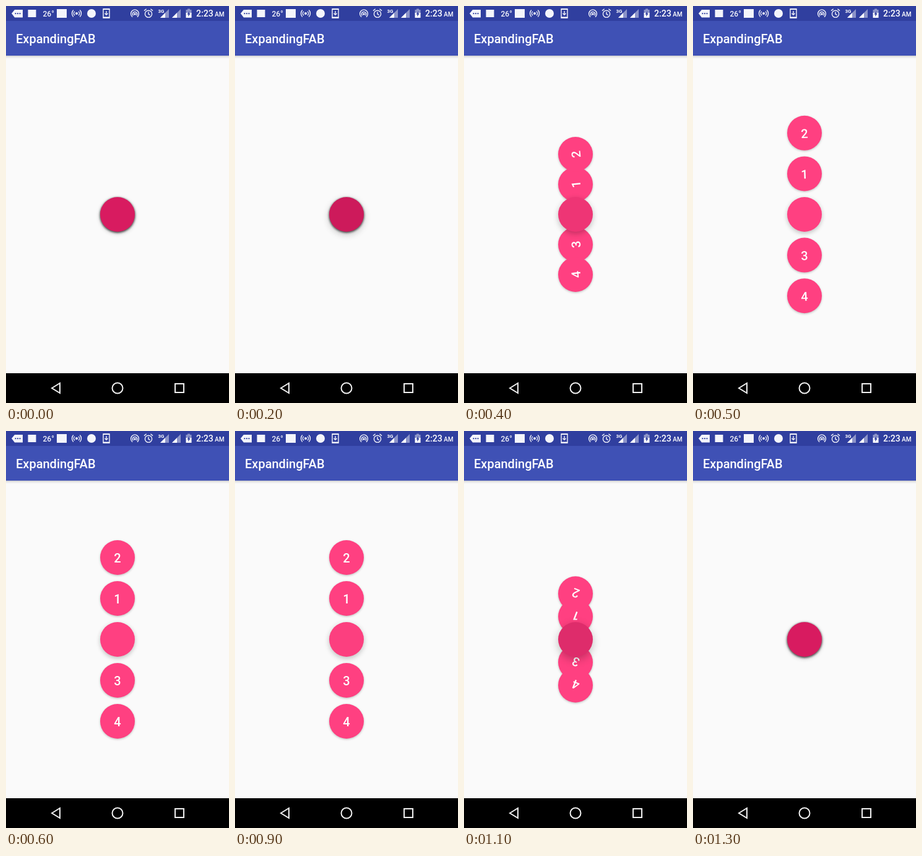
Recreate the animation shown at these times as an HTML page with a canvas. Size 360x640 px, loop 1.4 s.

```html
<!DOCTYPE html>
<html lang="en">
<head>
<meta charset="utf-8">
<title>ExpandingFAB</title>
<style>
html, body { margin: 0; width: 100%; height: 100%; overflow: hidden; background: #fafafa; }
canvas { display: block; width: 360px; height: 640px; }
</style>
</head>
<body>
<canvas id="stage" width="360" height="640"></canvas>
<script>
const ctx = document.getElementById('stage').getContext('2d');
const LOOP = 1400, STEP = 100;
const PRESS_EVERY = 800, PRESS_PEAK = 270, PRESS_SPREAD = 200;
const CX = 180, CY = 336, R = 28, GAP = 66;
const CLOSED = [216, 27, 96], OPENED = [255, 64, 129];
const SLOTS = { 1: -1, 2: -2, 3: 1, 4: 2 };
const FONT = 'Roboto, "Noto Sans", sans-serif';
const TAU = 2 * Math.PI;

const clamp = v => Math.min(1, Math.max(0, v));
const rgb = parts => `rgb(${parts.join(',')})`;

// Decelerates while opening, accelerates while closing
function openness(t) {
  if (t < PRESS_EVERY) return 1 - (1 - clamp((t - 289.5) / 228)) ** 2;
  return 1 - clamp((t - 916) / 277) ** 2;
}

// Strength of the touch on the main button
function pressure(t) {
  return clamp(1 - Math.abs(t % PRESS_EVERY - PRESS_PEAK) / PRESS_SPREAD);
}

function mainColor(open, press) {
  return rgb(CLOSED.map((c, i) => (c + (OPENED[i] - c) * open) * (1 - 0.08 * press)));
}

function text(str, x, y, size, weight = 500, align = 'left') {
  ctx.font = `${weight} ${size}px ${FONT}`;
  ctx.textAlign = align;
  ctx.fillText(str, x, y);
}

function rect(color, x, y, w, h) {
  ctx.fillStyle = color;
  ctx.fillRect(x, y, w, h);
}

function path(...points) {
  ctx.beginPath();
  points.forEach(([x, y]) => ctx.lineTo(x, y));
}

function poly(...points) {
  path(...points);
  ctx.fill();
}

function line(...points) {
  path(...points);
  ctx.stroke();
}

function dot(x, y, r) {
  ctx.beginPath();
  ctx.arc(x, y, r, 0, TAU);
  ctx.fill();
}

function arc(x, y, r, from = 0, to = TAU) {
  ctx.beginPath();
  ctx.arc(x, y, r, from, to);
  ctx.stroke();
}

function shade(alpha, blur, dy) {
  ctx.shadowColor = `rgba(0,0,0,${alpha})`;
  ctx.shadowBlur = blur;
  ctx.shadowOffsetY = dy;
}

// Shadow alone: the caster stays outside the stage
function shadow(y, elevation) {
  ctx.save();
  ctx.fillStyle = '#000';
  ctx.shadowOffsetX = 1000;
  shade(0.24, elevation * 1.2, elevation * 0.4);
  dot(CX - 1000, y, R);
  ctx.restore();
}

function disc(y, color) {
  ctx.fillStyle = color;
  dot(CX, y, R);
}

function signal(x) {
  ctx.fillStyle = '#8c94c9';
  poly([x, 19], [x + 14, 5], [x + 14, 19]);
  ctx.fillStyle = '#fff';
  poly([x, 19], [x + 8, 11], [x + 8, 19]);
}

function messageTag() {
  poly([9, 12], [14, 6], [27, 6], [27, 18.5], [14, 18.5]);
  ctx.fillStyle = '#303f9f';
  for (let i = 0; i < 3; i++) dot(15.5 + 3.5 * i, 12.2, 1.1);
}

function broadcast(x, y) {
  dot(x, y, 2);
  for (const r of [4.5, 7.5]) {
    arc(x, y, r, -0.8, 0.8);
    arc(x, y, r, Math.PI - 0.8, Math.PI + 0.8);
  }
}

function download(x) {
  ctx.strokeRect(x - 5, 4.8, 10, 14.4);
  ctx.fillRect(x - 5, 4, 10, 2);
  ctx.fillRect(x - 5, 17.5, 10, 2);
  line([x, 8], [x, 14]);
  line([x - 2.5, 11.8], [x, 14.3], [x + 2.5, 11.8]);
}

function hotspot(x) {
  dot(x, 13, 1.8);
  arc(x, 13, 3.6, 2.4, 7);
  arc(x, 12.5, 6.4, 2.2, 7.2);
}

function alarm(x) {
  arc(x, 12.8, 5.6);
  for (const side of [-1, 1]) line([x + 7 * side, 7.6], [x + 3.4 * side, 4.8]);
  line([x, 9.5], [x, 13], [x + 2.6, 14.6]);
}

function battery(x) {
  rect('#8c94c9', x - 4.5, 6, 9, 6);
  rect('#8c94c9', x - 2, 4.5, 4, 2);
  rect('#fff', x - 4.5, 11, 9, 8);
  ctx.fillStyle = '#303f9f';
  poly([x + 1, 8], [x - 2.6, 13.4], [x - 0.6, 13.4], [x - 0.8, 17.2], [x + 2.7, 11.8], [x + 0.6, 11.8]);
}

function statusBar() {
  rect('#303f9f', 0, 0, 360, 24);
  ctx.fillStyle = ctx.strokeStyle = '#f4f5fb';
  ctx.lineWidth = 1.4;
  messageTag();
  rect('#f4f5fb', 35.5, 6, 13, 12);
  text('26°', 59.5, 17, 12);
  ctx.fillRect(82, 5, 16, 14);
  dot(138, 12, 7);
  broadcast(114, 12);
  download(162);
  hotspot(208);
  alarm(230);
  signal(249);
  signal(268);
  rect('#303f9f', 245, 4, 10, 7.5);
  ctx.fillStyle = '#fff';
  text('3G', 245.5, 11, 8, 700);
  battery(295);
  ctx.fillStyle = '#fff';
  text('2:23', 307, 17, 14);
  text('AM', 337, 17, 10);
}

function navBar() {
  rect('#000', 0, 592, 360, 48);
  ctx.strokeStyle = '#f0f0f0';
  ctx.lineWidth = 2;
  path([74, 616], [87, 608], [87, 624]);
  ctx.closePath();
  ctx.stroke();
  arc(180, 616, 8.5);
  ctx.strokeRect(273, 609, 14, 14);
}

function toolbar() {
  ctx.save();
  shade(0.27, 4, 1);
  rect('#3f51b5', -10, 24, 380, 56);
  ctx.restore();
  ctx.fillStyle = '#fff';
  text('ExpandingFAB', 16, 60, 20);
}

function label(str, y, angle) {
  ctx.save();
  ctx.translate(CX, y);
  ctx.rotate(angle);
  ctx.fillStyle = '#fff';
  text(str, 0, 8, 20, 500, 'center');
  ctx.restore();
}

function buttons(t) {
  const open = openness(t), press = pressure(t);
  const items = Object.entries(SLOTS).map(([str, slot]) => [str, CY + slot * GAP * open]);
  items.forEach(([, y]) => shadow(y, 3));
  if (open > 0) {
    for (const [str, y] of items) {
      disc(y, rgb(OPENED));
      label(str, y, TAU * open);
    }
  }
  shadow(CY, 6 + 6 * press);
  disc(CY, mainColor(open, press));
}

function draw(t) {
  rect('#fafafa', 0, 0, 360, 640);
  toolbar();
  statusBar();
  navBar();
  buttons(t);
}

const start = performance.now();

function tick() {
  const t = (performance.now() - start) % LOOP;
  draw(Math.floor(t / STEP) * STEP);
  requestAnimationFrame(tick);
}
tick();
</script>
</body>
</html>
```
